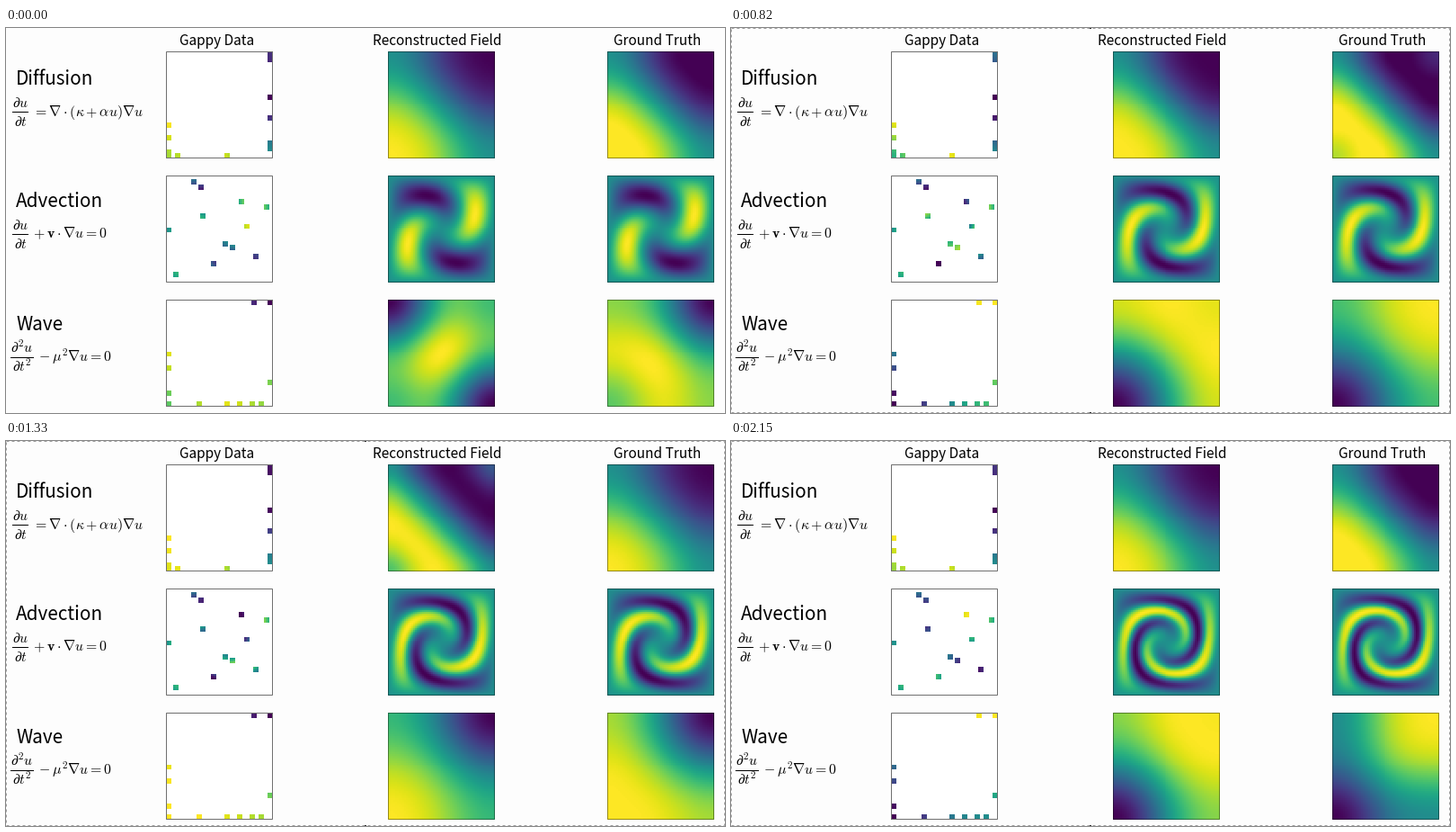
These frames come from a looping animation (800 by 428 pixels, 2180 ms). A matplotlib script:

```python
import numpy as np
import matplotlib.pyplot as plt
from matplotlib.animation import FuncAnimation
from matplotlib.patches import Rectangle

W, H, DPI = 800, 428, 100
LOOP, FRAMES, CYCLE = 2180, 72, 36
N, BOX, SENSOR = 60, 119, 3
COLS = (178, 425, 669)
ROWS = (26, 164, 302)
PX = 72 / DPI
PI = np.pi

plt.rcParams["mathtext.fontset"] = "cm"

mid = (np.arange(N) + 0.5) / N
X, Y = np.meshgrid(mid, mid[::-1])


# Sensors, as pixel offsets inside a box

def on_edges(left=(), right=(), bottom=(), top=()):
    near, far = 3, BOX - 3
    return ([(near, y) for y in left] + [(far, y) for y in right]
            + [(x, far) for x in bottom] + [(x, near) for x in top])


def sensor_mask(points):
    mask = np.zeros((N, N), bool)
    corners = np.rint(np.array(points) / BOX * N - SENSOR / 2).astype(int)
    for c, r in corners.clip(0, N - SENSOR):
        mask[r:r + SENSOR, c:c + SENSOR] = True
    return mask


MASKS = [sensor_mask(points) for points in (
    on_edges(left=(82, 96, 113, 116), right=(3, 9, 50, 74, 102, 108),
             bottom=(13, 68)),
    [(30, 6), (38, 13), (40, 44), (84, 28), (112, 34), (91, 56),
     (3, 60), (66, 76), (74, 80), (101, 90), (52, 99), (10, 111)],
    on_edges(left=(60, 76, 105), right=(93,),
             bottom=(3, 36, 68, 82, 96, 107), top=(98, 116)),
)]


# Diffusion: heat equation with closed walls, started from sin(pi (x + y))

def diffusion(tau, gain=1.0):
    def profile(x):
        series = sum(np.cos(2 * k * PI * x) * np.exp(-4 * k * k * tau)
                     / (4 * k * k - 1) for k in range(1, 13))
        return 2 / PI - 4 / PI * series
    u = profile(X) * np.cos(PI * Y) + np.cos(PI * X) * profile(Y)
    return gain * u / np.abs(u).max()


def diffusion_row(f):
    gappy, rec, true = (rate * ((f - start) % CYCLE) for rate, start
                        in ((0.011, 26), (0.013, 4), (0.02, 21.5)))
    fade = 1.05 * np.exp(-0.4 * max(true - 0.3, 0))
    return diffusion(gappy), diffusion(rec), diffusion(true, fade)


# Advection: every cell is traced back along a vortex to the start field

def swirl(x, y):
    return (-np.sin(PI * x) ** 2 * np.sin(2 * PI * y),
            np.sin(PI * y) ** 2 * np.sin(2 * PI * x))


def advection_states(count, dt=0.0078):
    x, y = X, Y
    states = []
    for _ in range(count):
        states.append(np.sin(2 * PI * x) * np.sin(2 * PI * y))
        vx, vy = swirl(x, y)
        vx, vy = swirl(x - vx * dt / 2, y - vy * dt / 2)
        x, y = x - vx * dt, y - vy * dt
    return states


LEAD = 23
RESTART = LEAD + FRAMES - 2
VORTEX = advection_states(LEAD + FRAMES)


def advection_row(f):
    u = VORTEX[f + LEAD]
    return VORTEX[(f + LEAD) % RESTART], u, u


# Wave: standing modes of a square, colours stretched to the full range

OMEGA, REST = PI / 33.2, 1.4


def wave(t1, t2):
    a = -np.sin(OMEGA * (t1 - REST))
    b = 0.85 * np.sin(1.43 * OMEGA * (t2 - REST))
    u = (a * (np.cos(PI * X) + np.cos(PI * Y))
         + b * np.cos(PI * X) * np.cos(PI * Y)
         - 0.06 * (np.cos(2 * PI * X) + np.cos(2 * PI * Y)))
    return 2 * (u - u.min()) / (u.max() - u.min()) - 1


def wave_row(f):
    u = wave(f, f)
    return u, wave(f + 1.4, f + 2.5), u


# Stage

fig = plt.figure(figsize=(W / DPI, H / DPI), dpi=DPI, facecolor="#fdfdfd")
ax = fig.add_axes([0, 0, 1, 1])


def label(x, y, text, px, **kw):
    ax.text(x, y, text, fontsize=px * PX, va="baseline", color="black", **kw)


def box(x, y, w, h, **kw):
    return ax.add_patch(Rectangle((x, y), w, h, **kw))


def equation(x, y, width, top, bottom, rest, px=15.8):
    """A built-up fraction with its bar at y, then the rest of the line."""
    box(x, y, width, 1, fc="black", ec="none")
    label(x + width / 2, y - 5, f"${top}$", px, ha="center")
    label(x + width / 2, y + 15.5, f"${bottom}$", px, ha="center")
    label(x + width + 5, y + 4.5, f"${rest}$", px)


def panel(x, y, edge):
    box(x, y, BOX, BOX, fc="white", ec="none", zorder=1)
    im = ax.imshow(np.zeros((N, N)), cmap="viridis", vmin=-1, vmax=1,
                   extent=(x, x + BOX, y + BOX, y), aspect="auto",
                   interpolation="nearest", zorder=2)
    box(x, y, BOX - 1, BOX - 1, fill=False, ec=edge, lw=PX, zorder=3)
    return im


CJK = dict(family="Noto Sans CJK JP")
for x, text in ((235, "Gappy Data"), (479.5, "Reconstructed Field"),
                (724.5, "Ground Truth")):
    label(x, 18.5, text, 15.4, ha="center", **CJK)

for y, text in ((63, "Diffusion"), (199, "Advection"), (336.5, "Wave")):
    label(11, y, text, 20.7, **CJK)

equation(7, 93, 18, r"\partial u", r"\partial t",
         r"= \nabla \cdot (\kappa + \alpha u) \nabla u")
equation(7, 229, 18, r"\partial u", r"\partial t",
         r"+\:\mathbf{v} \cdot \nabla u = 0")
equation(5, 366, 26, r"\partial^2 u", r"\partial t^2",
         r"-\:\mu^2 \nabla u = 0")

panels = [[panel(x, y, "#707070" if x == COLS[0] else (0, 0, 0, 0.4))
           for x in COLS] for y in ROWS]

outline = [box(0, 0, W - 1, H - 1, fill=False, ec="#a0a0a0", lw=PX,
               ls=(0, (3, 3)), zorder=4)]
outline += [box(W / 2 - 1, y, 2, 1, fc="#333333", ec="none", zorder=5)
            for y in (0, H - 1)]

ax.set_xlim(0, W)
ax.set_ylim(H, 0)
ax.axis("off")


def draw(f):
    rows = diffusion_row(f), advection_row(f), wave_row(f)
    for images, (gappy, rec, true), mask in zip(panels, rows, MASKS):
        images[0].set_data(np.where(mask, gappy, np.nan))
        images[1].set_data(rec)
        images[2].set_data(true)
    for part in outline:
        part.set_visible(f > 0)
    return [im for images in panels for im in images] + outline


anim = FuncAnimation(fig, draw, frames=FRAMES, interval=LOOP / FRAMES,
                     repeat=True, repeat_delay=0, blit=False)
plt.show()
```
